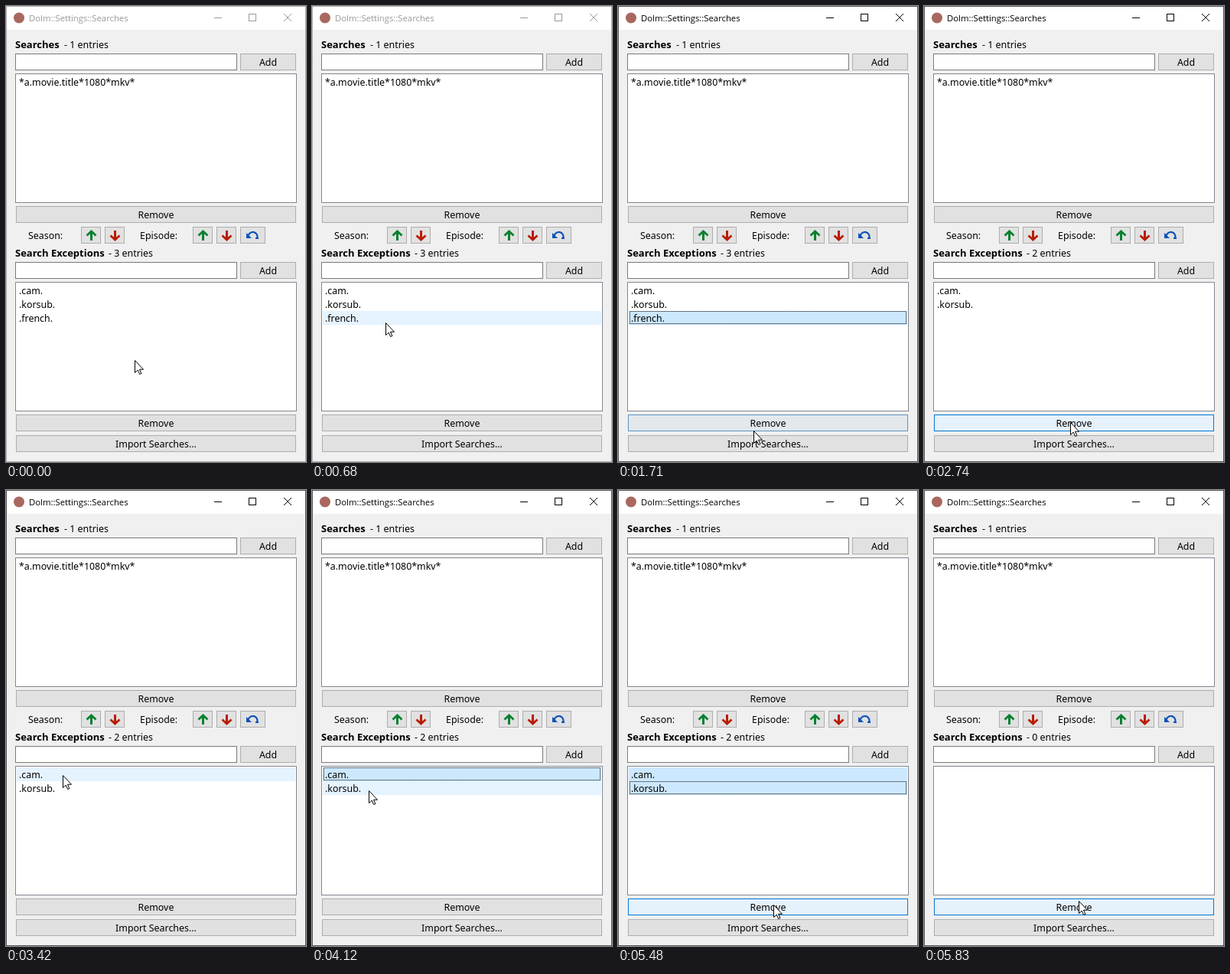
These frames come from a looping animation (392 by 595 pixels, 6.16 s). An HTML page with a canvas:

```html
<!DOCTYPE html>
<html lang="en">
<head>
<meta charset="utf-8">
<title>Search settings</title>
<style>
  html, body { margin: 0; width: 100%; height: 100%; overflow: hidden; background: #f0f0f0; }
  canvas { display: block; }
</style>
</head>
<body>
<canvas id="stage" width="392" height="595"></canvas>
<script>
const g = document.getElementById('stage').getContext('2d');
const LOOP = 6160;
const UI = '12.4px "Noto Sans", sans-serif';
const BOLD = 'bold 13px "Noto Sans", sans-serif';
const TITLE = '11.3px "Open sans", "Open Sans", sans-serif';
const ENTRIES = ['.cam.', '.korsub.', '.french.'];

// sel: number of selected rows ending at row `focus`; glow: hover strength of Remove
const STEPS = [
  { t: 0, at: [168, 462], rows: 3, idle: true },
  { t: 680, at: [96, 413], rows: 3, hot: 2, idle: true },
  { t: 1030, at: [94, 405], rows: 3, sel: 1, focus: 2, hot: 2 },
  { t: 1380, at: [82, 400], rows: 3, sel: 1, focus: 2, hot: 2 },
  { t: 1710, at: [177, 554], rows: 3, sel: 1, focus: 2, glow: 0.45 },
  { t: 2060, at: [190, 536], rows: 3, sel: 1, focus: 2, glow: 0.7 },
  { t: 2390, at: [190, 536], rows: 3, sel: 1, focus: 2, glow: 1 },
  { t: 2740, at: [191, 543], rows: 2, glow: 1 },
  { t: 3090, at: [150, 484], rows: 2 },
  { t: 3420, at: [74, 372], rows: 2, hot: 0 },
  { t: 4120, at: [74, 392], rows: 2, sel: 1, focus: 0, hot: 1 },
  { t: 4450, at: [74, 393], rows: 2, sel: 2, focus: 1, hot: 1 },
  { t: 4800, at: [172, 508], rows: 2, sel: 2, focus: 1 },
  { t: 5150, at: [196, 537], rows: 2, glow: 0.45, sel: 2, focus: 1 },
  { t: 5480, at: [203, 541], rows: 2, glow: 1, sel: 2, focus: 1 },
  { t: 5830, at: [202, 536], rows: 0, glow: 1 }
];

function text(s, x, y, font = UI, color = '#000', align = 'left') {
  g.font = font;
  g.fillStyle = color;
  g.textAlign = align;
  g.fillText(s, x, y);
  return x + g.measureText(s).width;
}

function box(x, y, w, h, fill, edge) {
  g.fillStyle = edge;
  g.fillRect(x, y, w, h);
  g.fillStyle = fill;
  g.fillRect(x + 1, y + 1, w - 2, h - 2);
}

function path(points, color, width) {
  g.beginPath();
  points.forEach(([x, y]) => g.lineTo(x, y));
  g.strokeStyle = color;
  g.lineWidth = width;
  g.stroke();
}

const mix = (a, b, k) => `rgb(${a.map((v, i) => Math.round(v + (b[i] - v) * k))})`;

function button(x, y, w, label = '', glow = 0) {
  box(x, y, w, 22, mix([225, 225, 225], [229, 241, 251], glow),
    mix([173, 173, 173], [0, 120, 215], glow));
  text(label, x + w / 2, y + 16, UI, '#000', 'center');
}

function arrowButton(x, dir, color) {
  button(x, 288, 26);
  const cx = x + 13.5, cy = 299.5, tip = cy + dir * 5.5;
  path([[cx, cy - dir * 6.5], [cx, tip]], color, 3);
  path([[cx - 6, cy], [cx, tip], [cx + 6, cy]], color, 2.8);
}

function undoButton() {
  button(306, 288, 33);
  const blue = '#0a50b8';
  g.beginPath();
  g.arc(322.5, 301, 6, Math.PI * 1.08, Math.PI * 2.08);
  g.strokeStyle = blue;
  g.lineWidth = 2.2;
  g.stroke();
  g.beginPath();
  g.moveTo(314, 296);
  g.lineTo(314, 303);
  g.lineTo(321, 303);
  g.fillStyle = blue;
  g.fill();
  g.fillRect(326, 302, 4, 2);
}

function windowFrame(idle) {
  const ink = idle ? '#999' : '#000';
  box(0, 0, 392, 595, '#f0f0f0', idle ? '#aaa' : '#555');
  g.fillStyle = '#fff';
  g.fillRect(1, 1, 390, 30);
  g.beginPath();
  g.arc(17, 15.5, 7, 0, 7);
  g.fillStyle = '#a8685f';
  g.fill();
  text('Dolm::Settings::Searches', 30, 20, TITLE, ink);
  path([[272, 15.5], [282, 15.5]], ink, 1);
  g.strokeRect(317.5, 10.5, 9, 9);
  path([[363, 10], [373, 20]], ink, 1);
  path([[373, 10], [363, 20]], ink, 1);
}

function section(y, name, count, glow) {
  text(name, 12, y, BOLD);
  text(`- ${count} entries`, name === 'Searches' ? 76 : 134, y);
  box(12, y + 7, 290, 22, '#fff', '#7a7a7a');
  button(306, y + 7, 73, 'Add');
  box(12, y + 33, 368, 169, '#fff', '#828790');
  button(13, y + 206, 366, 'Remove', glow);
}

function entry(i, s) {
  const y = 362 + 18 * i;
  const chosen = s.sel && i <= s.focus && i > s.focus - s.sel;
  const hot = s.hot === i;
  if (chosen) box(14, y, 364, 18, '#cce8ff', hot ? '#99d1ff' : '#cce8ff');
  else if (hot) box(14, y, 364, 18, '#e5f3ff', '#e5f3ff');
  if (chosen && s.focus === i) {
    g.setLineDash([1, 1]);
    g.strokeStyle = '#000';
    g.lineWidth = 1;
    g.strokeRect(15.5, y + 0.5, 361, 16);
    g.setLineDash([]);
  }
  text(ENTRIES[i], 17, y + 14);
}

function cursor([x, y]) {
  const shape = [[0, 0], [0, 16], [3.7, 12.6], [6.2, 18], [8.4, 17], [6, 11.7], [11, 11.7]];
  g.beginPath();
  shape.forEach(([dx, dy]) => g.lineTo(x + 0.5 + dx, y + 0.5 + dy));
  g.closePath();
  g.fillStyle = '#fff';
  g.fill();
  g.strokeStyle = '#000';
  g.lineWidth = 1;
  g.stroke();
}

function draw(now) {
  const t = now % LOOP;
  const s = STEPS.findLast(step => step.t <= t);
  windowFrame(s.idle);
  section(55, 'Searches', 1);
  text('*a.movie.title*1080*mkv*', 17, 104);
  text('Season:', 29, 304);
  text('Episode:', 175, 304);
  for (const x of [98, 244]) {
    arrowButton(x, -1, '#08802f');
    arrowButton(x + 31, 1, '#b81c00');
  }
  undoButton();
  section(327, 'Search Exceptions', s.rows, s.glow);
  for (let i = 0; i < s.rows; i++) entry(i, s);
  button(13, 560, 366, 'Import Searches...');
  cursor(s.at);
}

const start = performance.now();
function tick() {
  draw(performance.now() - start);
  requestAnimationFrame(tick);
}
tick();
</script>
</body>
</html>
```
